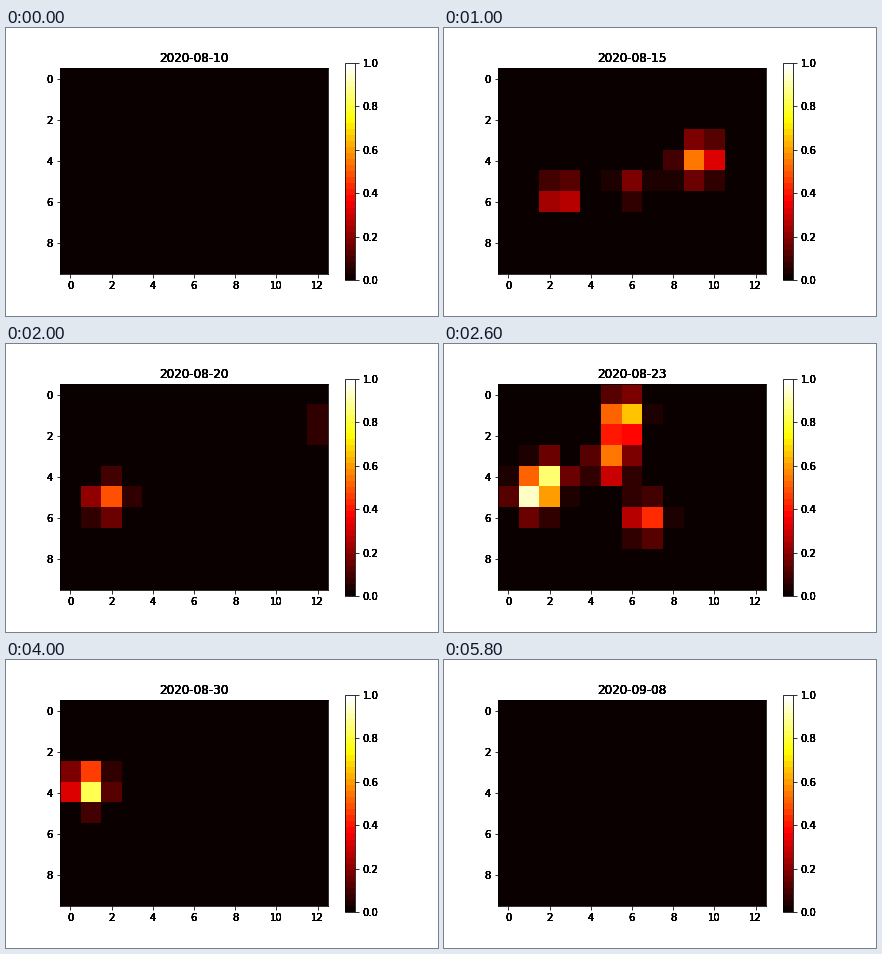
Animation, 432 px wide and 288 px high, one loop 6.8 s. Source, as a matplotlib script:

```python
import numpy as np
import matplotlib.pyplot as plt
from matplotlib.animation import FuncAnimation

plt.rcParams.update({"font.family": "DejaVu Sans", "font.size": 10,
                     "figure.subplot.bottom": 0.125})

ROWS, COLS = 10, 13
LAST_DAY = 29
HOLD = 5          # extra steps on the last day
FADE = 3          # days a spot takes to appear and to vanish
SIGMA = 0.6       # spot radius in cells
FLOOR = 0.04      # weaker cells stay empty
START = np.datetime64("2020-08-10")

# Each spot walks through key points: (day, x, y, strength)
WALKS = [
    [(3, 2.7, 6.3, 0.58), (7, 2.4, 5.3, 0.14), (13, 1.2, 4.9, 0.9),
     (20, 0.85, 3.7, 0.95), (26, 1.5, 3, 0.17)],
    [(13, 1.9, 4.1, 0.75), (16, 1.2, 3.6, 0.3)],
    [(3, 8.3, 4.95, 0.68), (7, 10.5, 2.6, 0.36), (10, 11.8, 1.5, 0.1)],
    [(3, 7.3, 5.95, 0.58), (5, 8.8, 4.4, 0.2)],
    [(3, 6, 5.5, 0.2), (7, 6, 4.8, 0.16)],
    [(13, 5.6, 0.95, 0.75)],
    [(13, 5.45, 2, 0.35)],
    [(13, 5, 3.3, 0.55)],
    [(13, 6.7, 6.05, 0.5), (15, 6.2, 7.5, 0.3)],
    [(26, 4, 4, 0.12), (28, 9.6, 6, 0.08), (29, 10, 6, 0)],
]

grid_y, grid_x = np.mgrid[:ROWS, :COLS]


def spot(walk, day):
    days, xs, ys, power = np.transpose(walk)
    x, y = np.interp(day, days, xs), np.interp(day, days, ys)
    life = [days[0] - FADE, *days, days[-1] + FADE]
    strength = np.interp(day, life, [0, *power, 0])
    dist2 = (grid_x - x) ** 2 + (grid_y - y) ** 2
    return strength * np.exp(-dist2 / (2 * SIGMA ** 2))


def heat(day):
    total = sum(spot(walk, day) for walk in WALKS)
    return np.where(total < FLOOR, 0, total)


def embolden(text, passes=8):
    """Draw a text several times over so that its soft edges turn solid."""
    draw = text.draw

    def draw_all(renderer):
        for _ in range(passes):
            draw(renderer)

    text.draw = draw_all


fig, ax = plt.subplots(figsize=(6, 4), dpi=72)
image = ax.imshow(heat(0), cmap=plt.get_cmap("hot", 36), vmin=0, vmax=1,
                  interpolation="nearest")
bar = fig.colorbar(image, ax=ax)
title = ax.set_title(str(START), fontsize=12)

fig.canvas.draw()
for text in [title, *ax.get_xticklabels(), *ax.get_yticklabels(),
             *bar.ax.get_yticklabels()]:
    embolden(text)


def update(step):
    day = min(step, LAST_DAY)
    image.set_data(heat(day))
    title.set_text(str(START + day))
    return image, title


anim = FuncAnimation(fig, update, frames=LAST_DAY + HOLD, interval=200,
                     init_func=lambda: update(0), repeat=True, repeat_delay=0)
plt.show()
```
